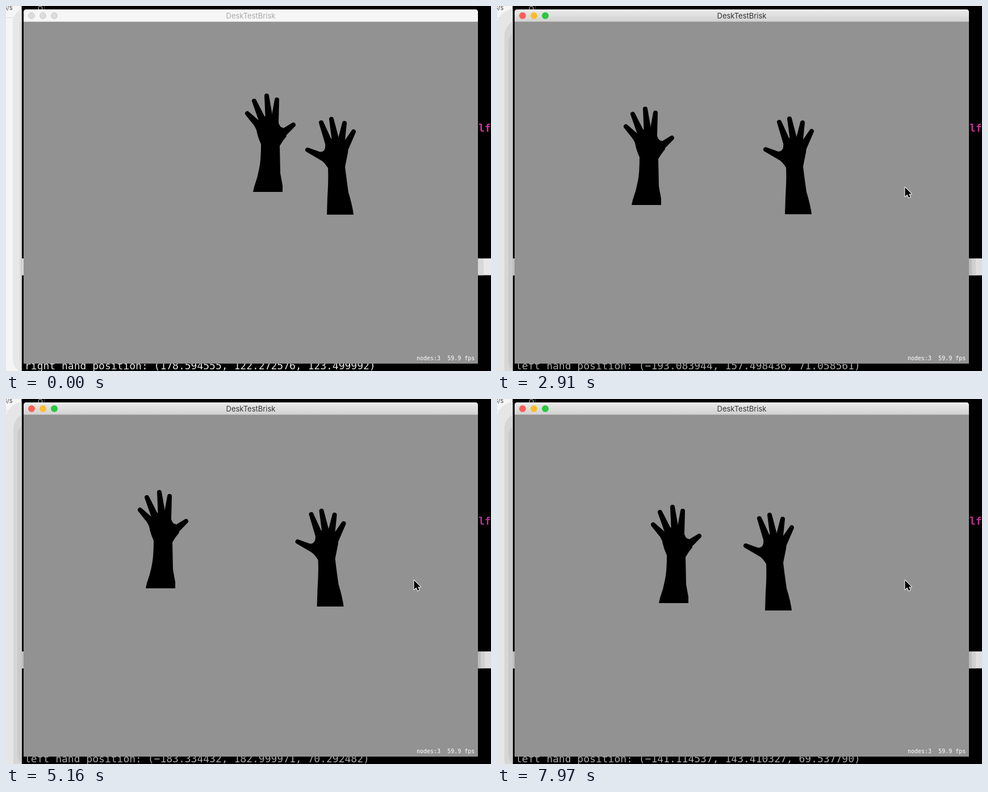
Animation of 854 by 642 pixels, one loop 8 s. Source, as an HTML page:

```html
<!DOCTYPE html>
<html lang="en">
<head>
<meta charset="utf-8">
<style>
  html, body { margin: 0; width: 100%; height: 100%; overflow: hidden; background: #000; }
  svg { display: block; width: 100%; height: 100%; }
  .mono { font-family: "DejaVu Sans Mono", monospace; font-size: 18px; white-space: pre; }
  #title { font: 13px Inter, sans-serif; text-anchor: middle; }
  .finger { stroke: #000; stroke-width: 8; stroke-linejoin: round; }

  svg { --bar: #f6f6f6; --divider: #d1d1d1; --title: #aaa; --code: #d9309f; --log: #e4e4e4; }
  svg.focused { --bar: url(#shine); --divider: #b4b4b4; --title: #333; --code: #bd3094; --log: #a8a8a8; }
  svg.focused .idle, svg:not(.focused) .active { display: none; }
</style>
</head>
<body>
<svg id="stage" viewBox="0 0 854 642">
  <defs>
    <clipPath id="strip"><path d="M0 0H27.5V642H0Z"/></clipPath>
    <linearGradient id="shine" x2="0" y2="1">
      <stop stop-color="#ebebeb"/><stop offset="1" stop-color="#d2d2d2"/>
    </linearGradient>
  </defs>

  <!-- desktop behind the window -->
  <rect width="854" height="642"/>
  <rect width="27.5" height="642" fill="#f5f5f5"/>
  <path d="M0 20.5H27.5" stroke="#ddd"/>
  <rect x="28" y="444" width="826" height="29.5" fill="#e8e8e8"/>
  <g class="idle">
    <g clip-path="url(#strip)">
      <rect x="12" y="4" width="840" height="642" rx="24" fill="#e7e7e7"/>
      <rect x="24" y="20" width="820" height="614" rx="14" fill="#dadada"/>
    </g>
    <rect x="28" y="444" width="813" height="29.5" fill="#d8d8d8"/>
  </g>
  <g class="active">
    <g clip-path="url(#strip)">
      <rect x="-2" y="5" width="860" height="690" rx="34" fill="#e6e6e6"/>
      <rect x="13" y="24" width="830" height="640" rx="28" fill="#d6d6d6"/>
      <rect x="20" y="42" width="820" height="604" rx="22" fill="#cacaca"/>
    </g>
    <rect x="28" y="444" width="826" height="29.5" fill="#dedede"/>
    <rect x="28" y="444" width="815" height="29.5" fill="#d0d0d0"/>
    <rect x="28" y="444" width="808" height="29.5" fill="#bdbdbd"/>
  </g>
  <text x="-5" y="7" font-family="Inter, sans-serif" font-size="11" fill="#444">3/s</text>
  <text class="mono" x="55" y="8" fill="#888">8</text>
  <path d="M67.5 0V6" stroke="#444"/>
  <text class="mono" x="832" y="221" font-weight="bold" fill="var(--code)">lf</text>
  <text class="mono" id="log" x="33" y="639" fill="var(--log)"></text>

  <!-- window -->
  <path d="M31 629V11Q31 6 36 6H826Q831 6 831 11V629Z" fill="#929292"/>
  <path d="M31 27V11Q31 6 36 6H826Q831 6 831 11V27Z" fill="var(--bar)"/>
  <path d="M31 27.5H831" stroke="var(--divider)"/>
  <g id="lights"></g>
  <text id="title" x="431" y="22" fill="var(--title)">DeskTestBrisk</text>

  <g id="left">
    <path d="M14 173H66V162L62 140 61 92Q66 83 73 75L67 60Q61 61 58 48L48 37 35 40 24 49 16 56
      20 64Q22 76 28 89Q28 117 25 131Q22 148 16 164Z"/>
  </g>
  <g id="right">
    <path d="M38 172H85Q83 156 76 133Q73 113 70 88L75 63Q76 51 80 44L71 43 58 37 47 37 35 50
      Q36 58 30 61L25 62V74Q33 79 40 90Q41 110 39 140Z"/>
  </g>

  <text class="mono" x="723" y="623" fill="#fff" style="font-size:10px">nodes:3  59.9 fps</text>
  <path class="active" d="M718.5 319V335L722.3 331.5L725 337L727.7 335.8L725.2 330.5H730Z"
    stroke="#fff" stroke-width="2" stroke-linejoin="round" paint-order="stroke"/>
</svg>
<script>
const LOOP = 8000, START = 500, STEP = 149.4, FOCUS_STEP = 1, LEFT_SEEN_STEP = 13;
const $ = id => document.getElementById(id);

function add(parent, tag, attributes) {
  const node = document.createElementNS('http://www.w3.org/2000/svg', tag);
  for (const name in attributes) node.setAttribute(name, attributes[name]);
  $(parent).append(node);
}

['#ff5f57', '#ffbd2e', '#28c940'].forEach((color, i) => {
  const dot = { cx: 45 + 20 * i, cy: 17 };
  add('lights', 'circle', { ...dot, r: 5.5, class: 'idle', fill: '#dcdcdc', stroke: '#cfcfcf' });
  add('lights', 'circle', { ...dot, r: 6, class: 'active', fill: color });
});

// fingers widen from the tip to the knuckle
function finger(hand, tipX, tipY, baseX, baseY) {
  const length = Math.hypot(baseX - tipX, baseY - tipY);
  const dx = 3 * (baseY - tipY) / length, dy = 3 * (tipX - baseX) / length;
  add(hand, 'path', {
    class: 'finger',
    d: `M${tipX} ${tipY}L${baseX + dx} ${baseY + dy}L${baseX - dx} ${baseY - dy}Z`
  });
}
finger('left', 4, 35, 27, 59);
finger('left', 16, 13, 34, 55);
finger('left', 38, 4, 43, 50);
finger('left', 56, 11, 52, 50);
finger('left', 85, 55, 66, 70);
finger('right', 4, 58, 34, 72);
finger('right', 28, 10, 43, 50);
finger('right', 46, 4, 55, 50);
finger('right', 69, 11, 62, 50);
finger('right', 85, 26, 70, 53);

// turning points of each hand: step, x, y
const moves = {
  left: [[13, 236, 183], [16, 223, 177], [20, 231, 185], [27, 245, 182], [31, 232, 160],
         [36, 248, 191], [44, 262, 191], [50, 271, 186]],
  right: [[-1, 527, 195], [11, 399, 202], [20, 525, 188], [27, 530, 188],
          [36, 484, 199], [44, 505, 188], [50, 434, 200]]
};

function place(side, step) {
  if (side === 'left' && step < LEFT_SEEN_STEP) return [421, 154];
  const points = moves[side];
  const next = Math.max(1, points.findIndex(p => p[0] >= step));
  const [s0, x0, y0] = points[next - 1], [s1, x1, y1] = points[next];
  const f = (step - s0) / (s1 - s0);
  return [x0 + (x1 - x0) * f, y0 + (y1 - y0) * f];
}

// sensor readings follow the hand on screen, with a little jitter
function logLine(step) {
  const side = step < LEFT_SEEN_STEP || step % 22 < 3 ? 'right' : 'left';
  const [x, y] = place(side, step);
  const reading = [
    side === 'left' ? 1.08 * (x - 402) : 1.49 * (x - 407),
    side === 'left' ? 145 - 1.5 * (y - 185) : 122 - 2.2 * (y - 195),
    70 + 53 * Math.exp(-(step + 1) / 4)
  ].map((v, i) => (v + Math.sin(step * 12.9898 + i) / 2).toFixed(6).replace('-', '−'));
  return `${side} hand position: (${reading.join(', ')})`;
}

function draw(time) {
  const step = Math.max(-1, Math.floor((time % LOOP - START) / STEP));
  for (const side in moves) $(side).setAttribute('transform', `translate(${place(side, step)})`);
  $('log').textContent = logLine(step);
  $('stage').classList.toggle('focused', step >= FOCUS_STEP);
}

const begin = performance.now();
(function frame() {
  draw(performance.now() - begin);
  requestAnimationFrame(frame);
})();
</script>
</body>
</html>
```
